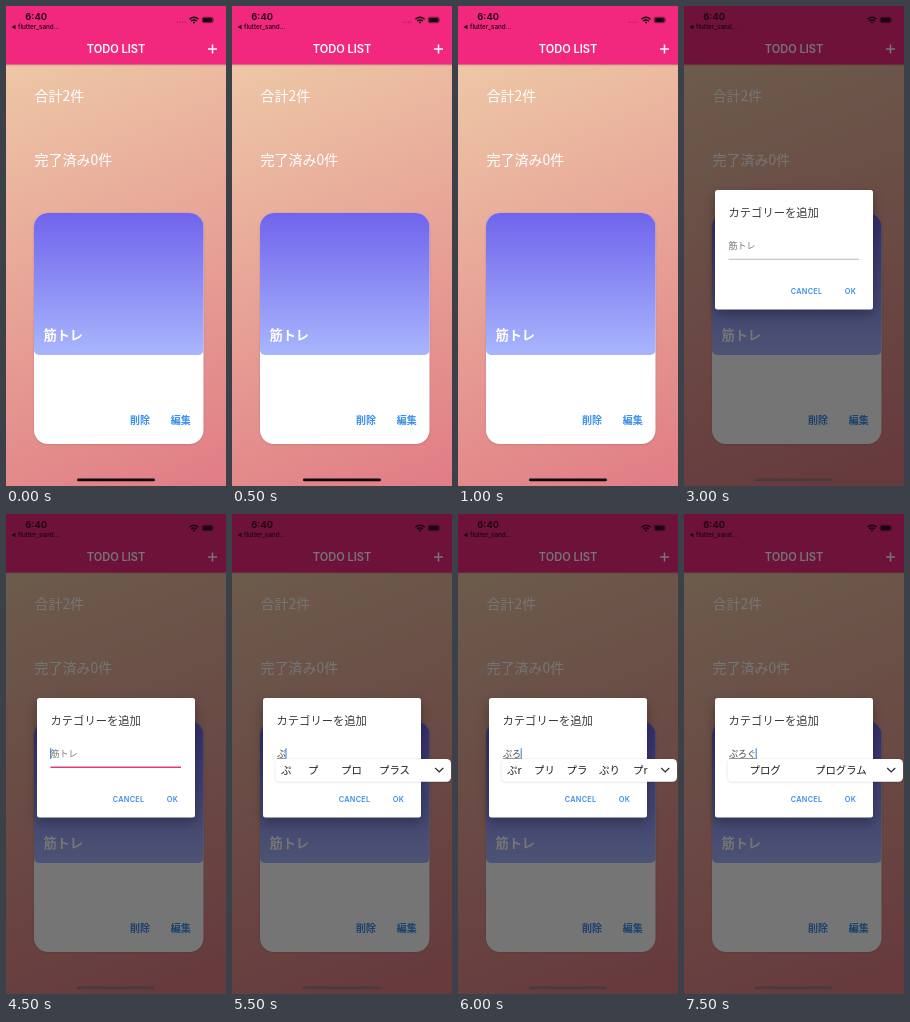
Write an HTML page that moves like this. It is 220x480 px and loops after 8000 ms.

```html
<!DOCTYPE html>
<html lang="ja">
<head>
<meta charset="utf-8">
<title>Todo list</title>
<style>
html, body { margin: 0; width: 100%; height: 100%; overflow: hidden; }
svg { display: block; width: 220px; height: 480px; font-family: "Noto Sans CJK JP", "Noto Sans CJK", sans-serif; }
.ui { font-family: Inter, Roboto, sans-serif; }
.link { fill: #3a90ee; font-size: 10px; font-weight: 700; }
.button { fill: #3b8eee; font-size: 7.3px; font-weight: 600; letter-spacing: .3px; }
.field { font-size: 9px; }
.pick { font-size: 10.4px; font-weight: 500; fill: #1c1c1e; }
</style>
</head>
<body>
<svg viewBox="0 0 220 480">
  <defs>
    <linearGradient id="page" gradientUnits="userSpaceOnUse" x1="0" y1="0" x2="190" y2="480">
      <stop stop-color="#efd0aa"/><stop offset="1" stop-color="#e17e86"/>
    </linearGradient>
    <linearGradient id="cover" x2="0" y2="1">
      <stop stop-color="#7064ec"/><stop offset="1" stop-color="#a8b6fd"/>
    </linearGradient>
    <filter id="soft" x="-30%" y="-30%" width="160%" height="160%"><feGaussianBlur stdDeviation="6"/></filter>
    <filter id="thin" x="-10%" y="-40%" width="120%" height="180%"><feGaussianBlur stdDeviation="1.3"/></filter>
  </defs>

  <rect width="220" height="480" fill="url(#page)"/>
  <rect x="-4" y="50" width="228" height="9" opacity=".2" filter="url(#thin)"/>
  <rect width="220" height="58.5" fill="#f2287f"/>
  <text class="ui" x="110" y="47" fill="#fff" text-anchor="middle" font-size="11.1" font-weight="600">TODO LIST</text>
  <path d="M202 43h9M206.5 38.5v9" stroke="#fff" stroke-width="1.5"/>

  <g fill="#fff" font-size="14">
    <text x="28.5" y="95.3">合計2件</text>
    <text x="28.5" y="159.3">完了済み0件</text>
  </g>

  <rect x="28" y="207.5" width="169.5" height="231" rx="14" opacity=".15" filter="url(#thin)"/>
  <rect x="28" y="207" width="169.5" height="231" rx="14" fill="#fff"/>
  <path d="M28 221a14 14 0 0 1 14-14H183.5a14 14 0 0 1 14 14V344a5 5 0 0 1-5 5H33a5 5 0 0 1-5-5Z" fill="url(#cover)"/>
  <text x="37.5" y="334" font-size="13.2" font-weight="700" fill="#fff">筋トレ</text>
  <text class="link" x="124" y="417.8">削除</text>
  <text class="link" x="164.7" y="417.8">編集</text>

  <rect width="220" height="480" opacity=".54" data-show="3000"/>

  <g class="ui" fill="#17060d">
    <text x="19.3" y="13.8" font-size="9.5" font-weight="600">6:40</text>
    <path d="M5.5 21l4-2.2v4.4Z"/>
    <text x="12" y="23.2" font-size="6.3" font-weight="500">flutter_sand...</text>
    <path d="M171 16.2h9" stroke="#17060d" stroke-width="1" stroke-dasharray="1 1.6" opacity=".45" data-show="0 3000"/>
    <g fill="none" stroke="#17060d" stroke-width="1.4">
      <path d="M183.4 13.2q4.6-4 9.2 0M185.2 15.1q2.8-2.4 5.6 0"/>
      <rect x="196.3" y="11.3" width="10.6" height="5.4" rx="1.6" stroke-width=".6"/>
    </g>
    <circle cx="188" cy="16.6" r="1"/>
    <rect x="197" y="12" width="9.2" height="4" rx="1"/>
    <path d="M207.6 13q1 1 0 2Z"/>
  </g>
  <rect x="71" y="472.5" width="78" height="2.8" rx="1.4" fill="#0b0608" data-show="0 3000"/>
  <rect x="71" y="472.5" width="78" height="2.8" rx="1.4" fill="#4a3a3c" data-show="3000"/>

  <g data-show="3000">
    <rect x="31" y="189" width="158" height="119" rx="3" opacity=".3" filter="url(#soft)"/>
    <rect x="31" y="184" width="158" height="119.5" rx="2.5" fill="#fff"/>
    <text x="44.5" y="211" font-size="11.3" fill="#3a3a3a">カテゴリーを追加</text>
    <text class="ui button" x="106.7" y="287.8">CANCEL</text>
    <text class="ui button" x="160.8" y="287.8">OK</text>
  </g>
  <text class="field" x="44.5" y="243.3" fill="#777" data-show="3000 5000">筋トレ</text>
  <path d="M44.5 253.3H175" stroke="#a9a9ae" stroke-width=".8" data-show="3000 4500"/>
  <path d="M44.5 253.3H175" stroke="#e23a78" stroke-width="1.4" data-show="4500"/>
  <g id="typed"></g>

  <g data-show="5500">
    <rect x="43.5" y="245.3" width="175.5" height="23" rx="4.5" opacity=".14" filter="url(#thin)"/>
    <rect x="43.5" y="245" width="175.5" height="22.8" rx="4.5" fill="#fff"/>
    <path d="M203.2 254l4 4 4-4" fill="none" stroke="#2a2a2c" stroke-width="1.2"/>
  </g>
  <g id="picks"></g>
</svg>
<script>
const LOOP = 8000;
const $ = id => document.getElementById(id);

// start, end, typed text, caret x
const typing = [
  [4500, 5000, '', 44.6],
  [5000, 5500, 'p', 50.6],
  [5500, 6000, 'ぷ', 54],
  [6000, 7500, 'ぷろ', 63.2],
  [7500, LOOP, 'ぷろぐ', 72.2],
];

// start, end, [x, suggestion]...
const suggestions = [
  [5500, 6000, [49, 'ぷ'], [76, 'プ'], [109, 'プロ'], [147, 'プラス']],
  [6000, 7500, [49, 'ぷr'], [76, 'プリ'], [108.5, 'プラ'], [141, 'ぷり'], [175, 'プr']],
  [7500, LOOP, [65.5, 'プログ'], [131, 'プログラム']],
];

$('typed').innerHTML = typing.map(([from, to, text, caret]) => `
  <g data-show="${from} ${to}">
    <text class="field" x="45" y="243" fill="#444">${text}</text>
    ${text && `<path d="M45 244.4H${caret - .6}" stroke="#666" stroke-width=".7"/>`}
    <path d="M${caret} 234.3V245" stroke="#3f86ea" stroke-width="1.1"/>
  </g>`).join('');

$('picks').innerHTML = suggestions.map(([from, to, ...words]) => `
  <g class="pick" data-show="${from} ${to}">
    ${words.map(([x, word]) => `<text x="${x}" y="260.2">${word}</text>`).join('')}
  </g>`).join('');

// Visible only between the two times; the end defaults to the loop's end.
function showBetween(el, from, to = LOOP) {
  const key = (time, visible) => ({
    offset: time / LOOP,
    visibility: visible ? 'visible' : 'hidden',
    easing: 'step-end',
  });
  const keys = [key(0, from === 0)];
  if (from > 0) keys.push(key(from, true));
  if (to < LOOP) keys.push(key(to, false));
  keys.push(key(LOOP, to === LOOP));
  const player = el.animate(keys, { duration: LOOP, iterations: Infinity });
  player.startTime = document.timeline.currentTime;
}

for (const el of document.querySelectorAll('[data-show]')) {
  showBetween(el, ...el.dataset.show.split(' ').map(Number));
}
</script>
</body>
</html>
```
